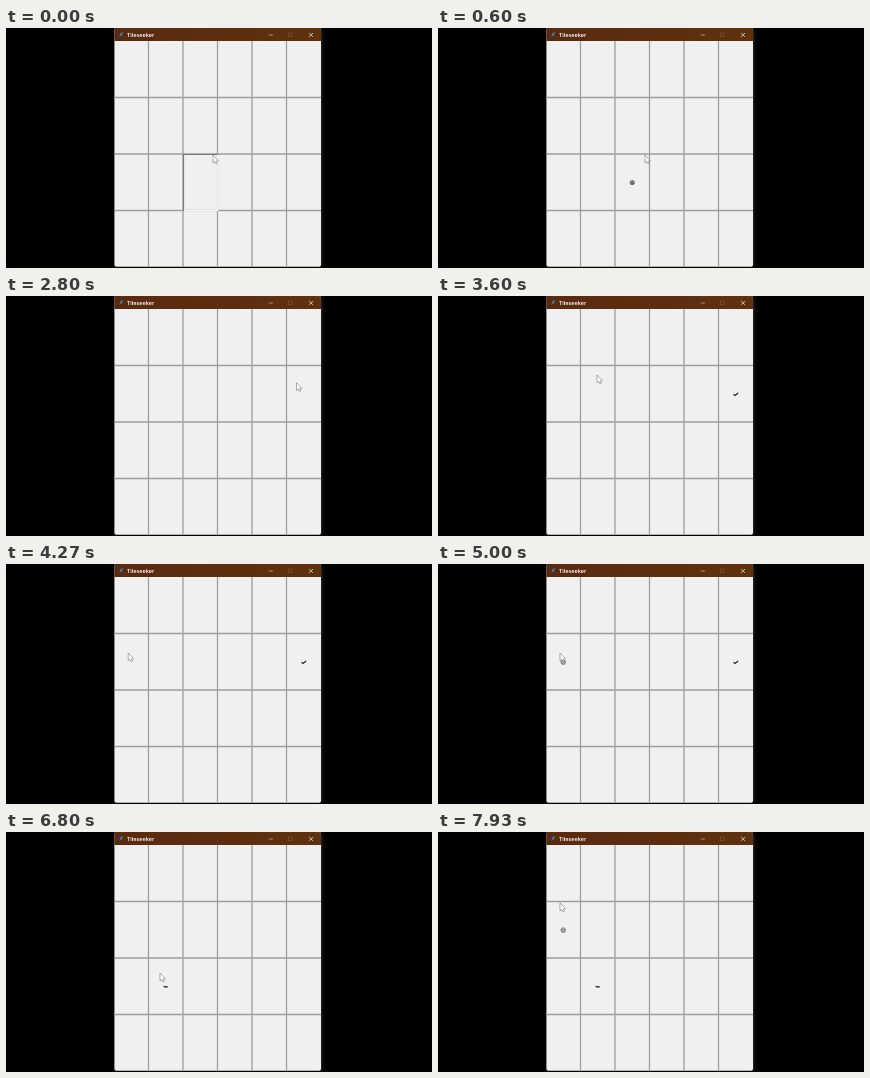
Animation, 426 px wide and 240 px high, one loop 8000 ms. Source, as an HTML page:

```html
<!DOCTYPE html>
<html lang="en">
<head>
<meta charset="utf-8">
<title>Tile game</title>
<style>
  html, body { margin: 0; width: 100%; height: 100%; overflow: hidden; background: #000; }
  svg { display: block; width: 100vw; height: 100vh; }
</style>
</head>
<body>
<svg viewBox="0 0 426 240" xmlns="http://www.w3.org/2000/svg">
  <defs>
    <linearGradient id="bar">
      <stop offset="0" stop-color="#5a2a10"/>
      <stop offset="1" stop-color="#60310d"/>
    </linearGradient>
    <clipPath id="window"><rect x="108.4" y="0" width="206.7" height="238.7" rx="2"/></clipPath>
    <g id="globe" fill="none" stroke="#555" stroke-width=".7">
      <circle r="2.2" fill="#bbb"/>
      <path d="M-2 -.6H2M-2 .8H2M0 -2V2"/>
    </g>
    <g id="fish" fill="#111">
      <ellipse cx=".8" cy="0" rx="1.7" ry="1.4"/>
      <path d="M-2.7 1.4L-1.4 -1.2L0 0L-.6 1.5Z" fill="#444"/>
    </g>
    <path id="tick" d="M-2.3 .2L-.7 1.3L2.4 -1.2" fill="none" stroke="#222" stroke-width="1.2"/>
    <g id="boat">
      <path d="M-2.5 -.8L2.5 -.3L2 .8H-1.8Z" fill="#444"/>
      <path d="M-1.2 .2H1.3" stroke="#7a3030" stroke-width=".7"/>
    </g>
    <g id="face" fill="none" stroke="#555" stroke-width=".7">
      <circle r="2.3" fill="#ddd"/>
      <path d="M-2 -.5H2M-1.4 1H1.4"/>
    </g>
  </defs>
  <rect width="426" height="240"/>
  <rect x="315" y="1" width="3" height="238" fill="#0b0b0b"/>
  <g clip-path="url(#window)">
    <rect x="108" width="208" height="240" fill="#f0f0f1"/>
    <rect x="108" width="208" height="13" fill="url(#bar)"/>
    <path id="grid" fill="none" stroke="#9c9f9c" stroke-width="1.3"/>
    <g id="pressed"></g>
    <path d="M113.4 8.8L114.3 5.3L117 3.8L116.2 7.2Z" fill="#3f76a8"/>
    <text x="121" y="8.7" font-family="'Open Sans', 'Noto Sans', sans-serif" font-size="5.6" font-weight="600" fill="#fff">Tileseeker</text>
    <g fill="none" stroke-width=".7">
      <path d="M262.8 7H266.8" stroke="#c9b8aa"/>
      <rect x="282.5" y="5" width="3.6" height="3.6" stroke="#79543b"/>
      <path d="M303.2 5L307 8.8M307 5L303.2 8.8" stroke="#eee"/>
    </g>
  </g>
  <g id="icons"></g>
  <path id="cursor" d="M0 0V8L1.8 6.4L3 9L4.3 8.4L3.2 5.9H5.5Z" fill="#fff" stroke="#777" stroke-width=".6"/>
</svg>
<script>
const LOOP = 8000, STEP = 1000 / 15;
const LEFT = 108, TOP = 13, W = 34.5, H = 56.5;
const $ = id => document.getElementById(id);
const edgeX = col => LEFT + col * W;
const edgeY = row => TOP + row * H;

// [time, x, y] of the pointer tip
const path = [
  [0, 207, 127], [800, 207, 127], [1600, 237, 109], [2350, 237, 109],
  [2850, 292, 86], [3150, 292, 86], [3600, 159, 79], [4300, 122, 89],
  [5250, 122, 89], [6150, 154, 141], [6900, 154, 141], [7550, 122, 71], [8000, 122, 71]
];
// icon, column, row, press time, hide time
const tiles = [
  ['globe', 2, 2, 0, 2350],
  ['fish', 3, 1, 1640, 2350],
  ['tick', 5, 1, 2920, 5300],
  ['face', 0, 1, 4420, 5300],
  ['boat', 1, 2, 6250, LOOP],
  ['face', 0, 1, 7640, LOOP]
].map(([icon, col, row, press, hide]) => ({ icon, col, row, press, hide }));
const HOLD = 130;

let lines = '';
for (let col = 1; col < 6; col++) lines += `M${edgeX(col)} 13V239`;
for (let row = 1; row < 4; row++) lines += `M108 ${edgeY(row)}H315`;
$('grid').setAttribute('d', lines);

for (const tile of tiles) {
  const x = edgeX(tile.col + .5), y = edgeY(tile.row + .5) + .4;
  $('icons').insertAdjacentHTML('beforeend', `<use href="#${tile.icon}" x="${x}" y="${y}"/>`);
  tile.view = $('icons').lastElementChild;
  const l = edgeX(tile.col), t = edgeY(tile.row);
  const r = edgeX(tile.col + 1), b = edgeY(tile.row + 1);
  $('pressed').insertAdjacentHTML('beforeend', `<g fill="none">
    <path d="M${l + 1} ${b}H${r}V${t + 1}" stroke="#f6f6f6" stroke-width="1.6"/>
    <path d="M${l + .5} ${b}V${t + .5}H${r}" stroke="#777a80" stroke-width="1.2"/></g>`);
  tile.down = $('pressed').lastElementChild;
}

const show = (node, on) => node.setAttribute('visibility', on ? 'visible' : 'hidden');

function pointer(time) {
  const i = path.findIndex(point => point[0] > time);
  const [t0, x0, y0] = path[i - 1], [t1, x1, y1] = path[i];
  const p = (time - t0) / (t1 - t0), ease = p * p * (3 - 2 * p);
  return [x0 + (x1 - x0) * ease, y0 + (y1 - y0) * ease];
}

function draw(now) {
  const time = Math.floor((now % LOOP) / STEP) * STEP;
  for (const tile of tiles) {
    const age = time - tile.press;
    show(tile.down, age >= 0 && age < HOLD);
    show(tile.view, age >= HOLD && time < tile.hide);
  }
  $('cursor').setAttribute('transform', `translate(${pointer(time)})`);
}

const start = performance.now();
function tick() {
  draw(performance.now() - start);
  requestAnimationFrame(tick);
}
tick();
</script>
</body>
</html>
```
